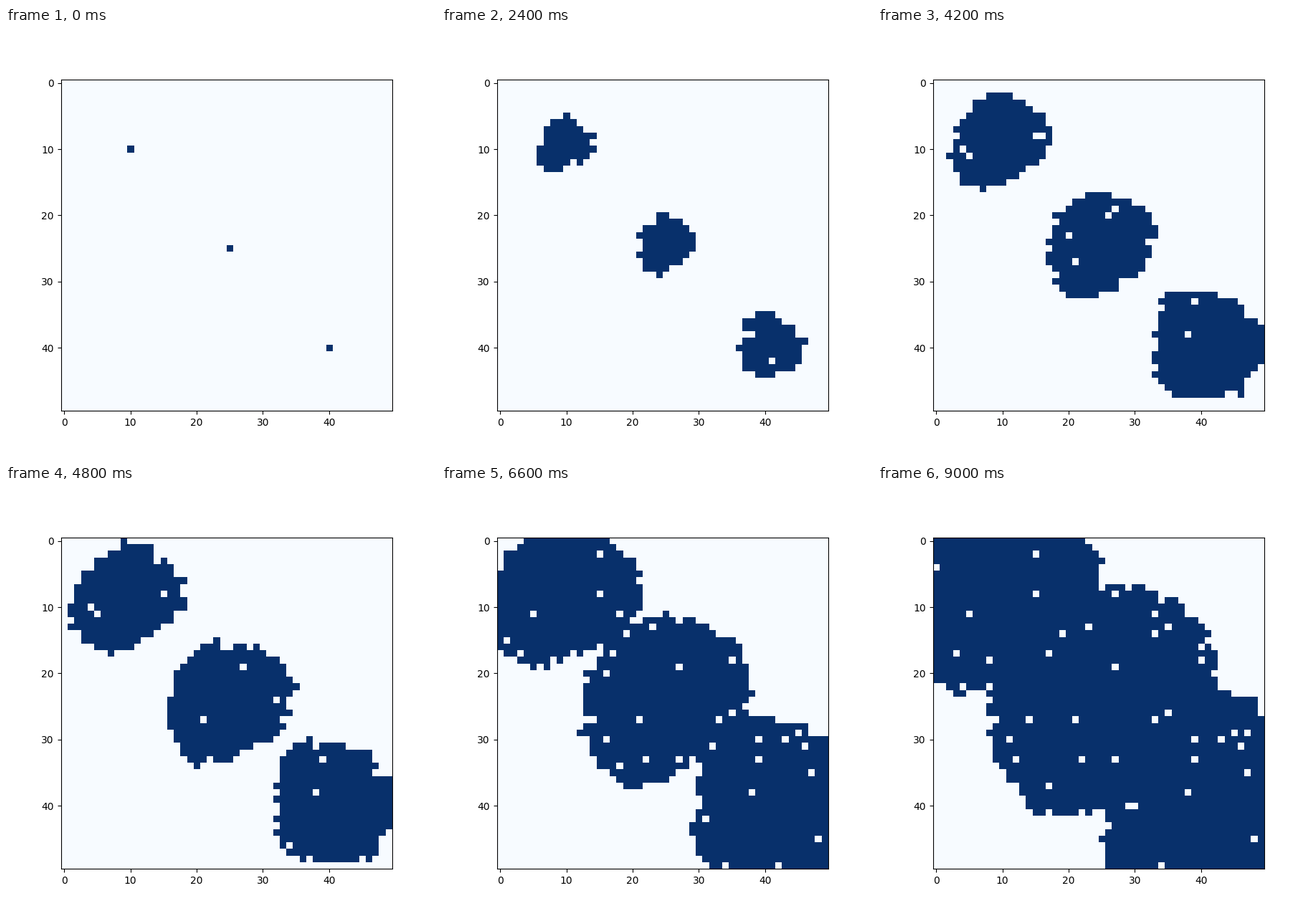
Animation, 600 px wide and 600 px high, one loop 9.3 s. Source, as a matplotlib script:

```python
import numpy as np
import matplotlib.pyplot as plt
from matplotlib.animation import FuncAnimation

SIZE, FRAMES, STEP_MS = 50, 31, 300
rng = np.random.default_rng(7)
ys, xs = np.mgrid[:SIZE, :SIZE]

# Growth in cells per step, every 30 degrees clockwise from the right
COLONIES = {
    10: [.48, .40, .32, .36, .50, .56, .56, .53, .53, .62, .54, .54],
    25: [.57, .52, .40, .50, .63, .60, .57, .57, .61, .62, .62, .64],
    40: [.72, .63, .58, .54, .57, .56, .46, .53, .69, .60, .60, .65],
}


def arrival(seed, speeds):
    """Step at which a colony started at (seed, seed) reaches each cell."""
    dx, dy = xs - seed, ys - seed
    angle = np.degrees(np.arctan2(dy, dx))
    speed = np.interp(angle, np.arange(0, 360, 30), speeds, period=360)
    return np.hypot(dx, dy) / speed


def beside(grid):
    """Cells that share a side with a filled cell."""
    pad = np.pad(grid, 1)
    return pad[:-2, 1:-1] | pad[2:, 1:-1] | pad[1:-1, :-2] | pad[1:-1, 2:]


def spread():
    reach = np.min([arrival(*colony) for colony in COLONIES.items()], axis=0)
    ripe = reach - 0.3 + rng.normal(0, 0.9, reach.shape)

    # Some cells stay empty, more often far from the seeds; others fill late
    luck = rng.random(reach.shape)
    skip = 0.045 * np.minimum(reach / FRAMES, 1)
    ripe[luck < skip] = np.inf
    ripe[luck > 0.975] += 5

    grid = reach == 0
    grids = [grid]
    for step in range(1, FRAMES):
        grid = grid | (beside(grid) & (ripe <= step))
        grids.append(grid)
    return grids


grids = spread()
fig, ax = plt.subplots(figsize=(6, 6), dpi=100)
image = ax.imshow(grids[0].astype(float), cmap="Blues", vmin=0, vmax=1)


def update(step):
    image.set_data(grids[step].astype(float))
    return [image]


anim = FuncAnimation(fig, update, frames=FRAMES, interval=STEP_MS,
                     repeat=True, repeat_delay=0)
plt.show()
```
